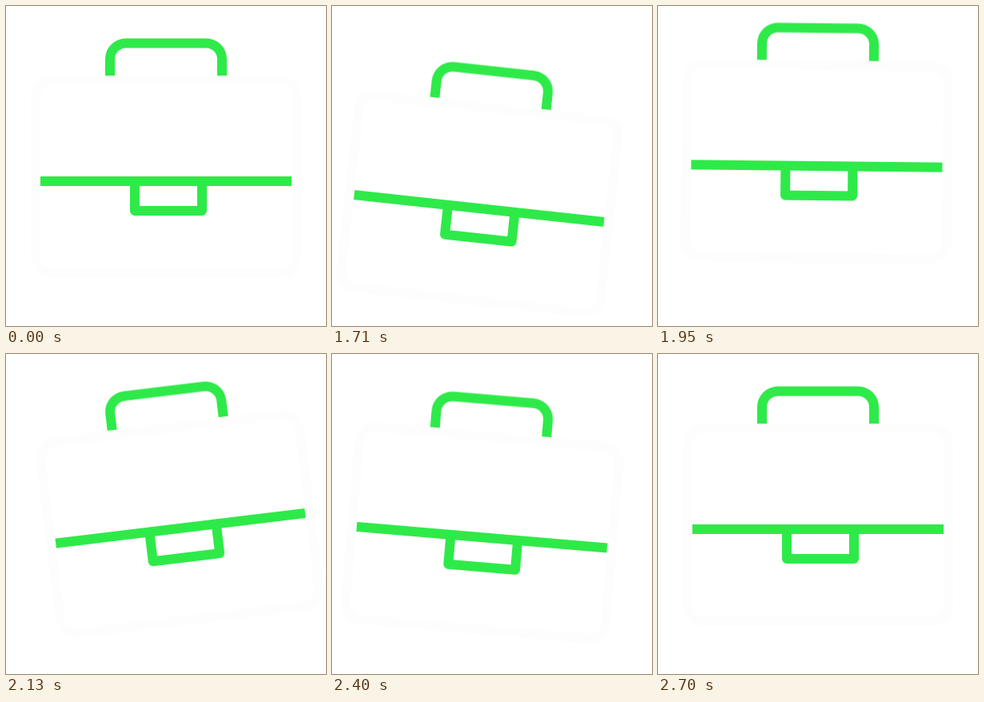
An HTML page for the animation above (2730 ms loop, 400 px wide and 400 px high).

```html
<!DOCTYPE html>
<html lang="en">
<head>
<meta charset="utf-8">
<title>Briefcase</title>
<style>
  html, body { margin: 0; width: 100%; height: 100%; overflow: hidden; background: #fff; }
  svg { display: block; width: 100%; height: 100%; }
  path, rect { fill: none; stroke: #2eea49; stroke-width: 12; stroke-linejoin: round; }
  rect { stroke: #fdfdfd; }
  #swing { transform-origin: 200px 69px; }
</style>
</head>
<body>
<svg viewBox="0 0 400 400">
  <g id="bounce">
    <g id="swing">
      <rect x="37" y="93" width="326" height="241" rx="20"/>
      <path d="M130 87V66.5a20 20 0 0 1 20-20h100a20 20 0 0 1 20 20V87"/>
      <path d="M161 219v37h84v-37"/>
      <path d="M43 219h314"/>
    </g>
  </g>
</svg>
<script>
  const LOOP = 2730;

  // Rest, ease through the turning points [ms, value], then rest again.
  function play(id, start, turns, end, toTransform) {
    const steps = [[0, 0], [start, 0], ...turns, [end, 0], [LOOP, 0]];
    const frames = steps.map(([time, value]) => ({
      offset: time / LOOP,
      transform: toTransform(value),
      easing: 'ease-in-out'
    }));
    const anim = document.getElementById(id).animate(frames, { duration: LOOP, iterations: Infinity });
    anim.startTime = document.timeline.currentTime;
  }

  play('bounce', 1492, [[1668, 37.5], [1950, -19], [2290, 15]], 2590, y => `translate(0px, ${y}px)`);
  play('swing', 1500, [[1785, 7.2], [2130, -6.9], [2360, 5]], 2690, a => `rotate(${a}deg)`);
</script>
</body>
</html>
```
